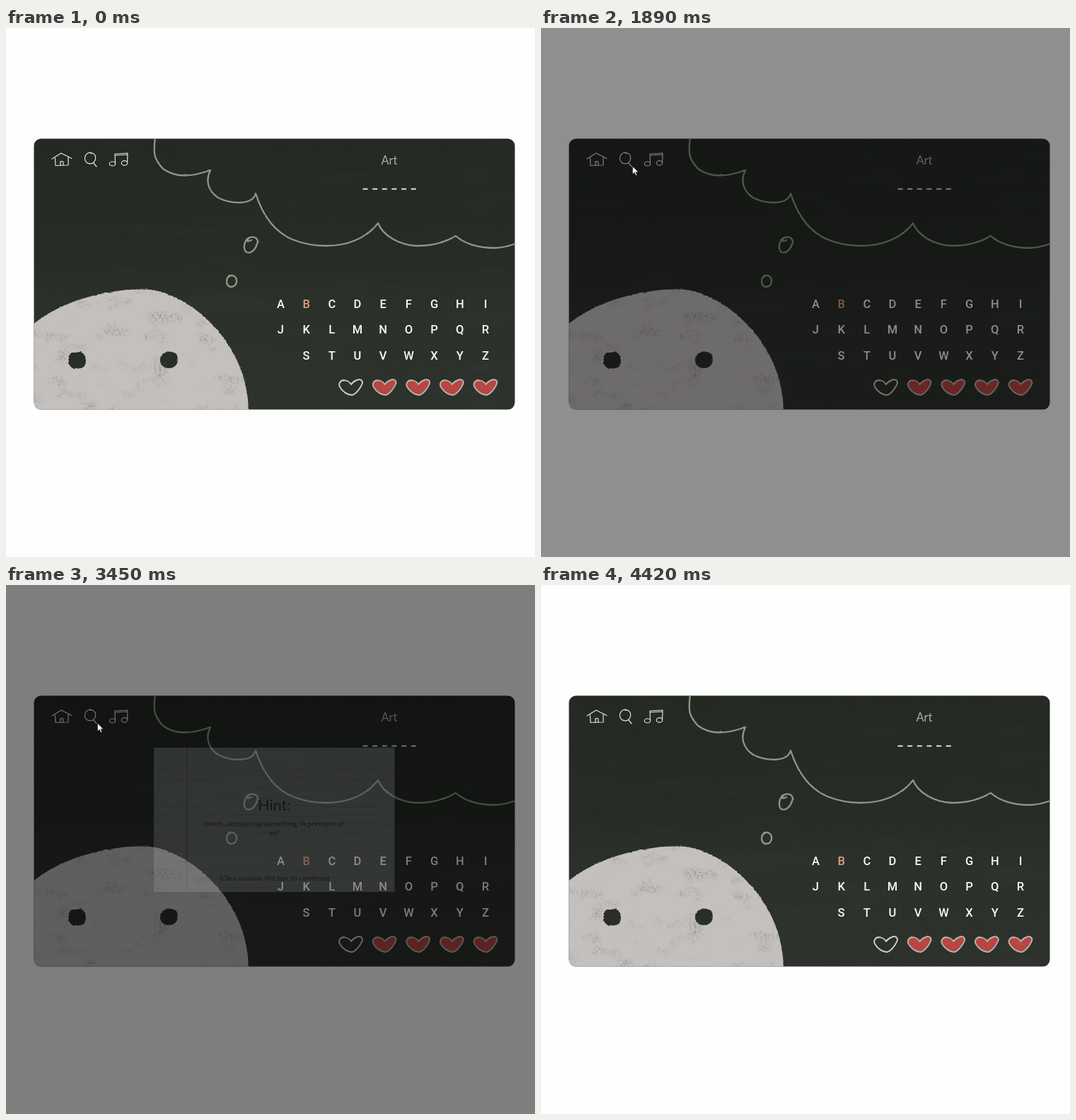
An HTML page for the animation above (4.82 s loop, 748x748 px).

```html
<!DOCTYPE html>
<html lang="en">
<head>
<meta charset="utf-8">
<title>Word game hint</title>
<style>
  html, body { margin: 0; height: 100%; overflow: hidden; background: #fefefe; }
  svg { display: block; width: 100vw; height: 100vh; }
  text { font-family: Lato, sans-serif; text-anchor: middle; }
  #letters text { font-family: Roboto, sans-serif; }
  .line { fill: none; stroke-linecap: round; stroke-linejoin: round; }
</style>
</head>
<body>
<svg viewBox="0 0 748 748">
  <defs>
    <linearGradient id="slate" x2="0" y2="1">
      <stop offset="0" stop-color="#242923"/>
      <stop offset=".45" stop-color="#272c26"/>
      <stop offset=".6" stop-color="#2b302a"/>
      <stop offset="1" stop-color="#2d322c"/>
    </linearGradient>
    <clipPath id="boardShape"><rect x="39.5" y="156.6" width="680" height="383" rx="10"/></clipPath>
    <clipPath id="noteShape"><rect x="209" y="246" width="340.5" height="204"/></clipPath>
    <filter id="chalk" x="-10%" y="-10%" width="120%" height="120%" color-interpolation-filters="sRGB">
      <feTurbulence type="fractalNoise" baseFrequency=".25" numOctaves="2" seed="4"/>
      <feDisplacementMap in="SourceGraphic" scale="1.8" xChannelSelector="R" yChannelSelector="G"/>
    </filter>
    <filter id="smear" x="0" y="0" width="1" height="1" color-interpolation-filters="sRGB">
      <feTurbulence type="fractalNoise" baseFrequency=".008 .04" numOctaves="3" seed="8"/>
      <feColorMatrix values="0 0 0 0 .6  0 0 0 0 .65  0 0 0 0 .58  3 0 0 0 -1.4"/>
    </filter>
    <filter id="paint" x="-5%" y="-5%" width="110%" height="110%" color-interpolation-filters="sRGB">
      <feTurbulence type="fractalNoise" baseFrequency=".3" numOctaves="2" seed="3" result="grain"/>
      <feDisplacementMap in="SourceGraphic" in2="grain" scale="2.6" xChannelSelector="R" yChannelSelector="G" result="body"/>
      <feTurbulence type="fractalNoise" baseFrequency=".03 .045" numOctaves="2" seed="12"/>
      <feColorMatrix values="0 0 0 0 0  0 0 0 0 0  0 0 0 0 0  2 0 0 0 -1.08" result="patches"/>
      <feColorMatrix in="grain" values="0 0 0 0 .3  0 0 0 0 .3  0 0 0 0 .29  1.6 0 0 0 -.6"/>
      <feComposite in2="patches" operator="in"/>
      <feComposite in2="body" operator="in" result="spots"/>
      <feMerge><feMergeNode in="body"/><feMergeNode in="spots"/></feMerge>
    </filter>
    <path id="heart" d="M1-4C-1-8-6-10-10-10C-15-9-18-4-14 1C-11 6-4 11 2 11C8 10 15 0 17-6C17-11 12-12 9-10C6-9 3-7 1-4Z"/>
  </defs>

  <rect width="748" height="748" fill="#fefefe"/>
  <g clip-path="url(#boardShape)">
    <rect x="39" y="156" width="681" height="384" fill="url(#slate)"/>
    <rect x="39" y="156" width="681" height="384" filter="url(#smear)" opacity=".02"/>
    <g class="line" stroke="#8b9a86" stroke-width="2.3" filter="url(#chalk)">
      <path d="M211 154C208 178 209 185 222 199C238 211 262 211 289 201C282 215 285 230 300 240C320 250 349 250 353 234C362 262 377 287 405 299C420 305 437 308 452 308C482 308 509 298 526 276C533 293 555 307 581 308C602 308 621 303 636 294C648 305 668 311 690 311C702 311 712 308 722 304.500"/>
      <path d="M343 298C336 301 335 313 340 317C347 320 354 312 356 302C355 294 345 294 340 299C339 302 343 302 347 300"/>
      <path d="M316 350C310 355 311 365 318 366C326 366 328 357 324 352C321 349 317 349 315 352"/>
    </g>
    <g filter="url(#paint)">
      <path fill="#c4c0bd" d="M32 424C66 395 103 382 140 375C163 370 190 368 212 371C248 380 279 403 303 432C328 464 343 500 343 545H32Z"/>
      <path fill="#292e28" d="M93 459L106 458Q113 463 113 470Q113 479 106 481L96 482Q88 478 88 470Q88 462 93 459ZM224 459Q234 455 241 461Q244 467 242 474Q239 481 230 481Q221 481 218 473Q217 463 224 459Z"/>
    </g>
  </g>

  <g class="line" stroke="#e4e6e1" stroke-width="1.200">
    <path d="M65 185L78 177L93 184.500M69.500 184L70 194.500L88 194V183M77 194V188.500M77 190Q80 186.500 81 190V194"/>
    <path d="M122 177C115 174 110 181 112 187C114 193 123 194 126 187C128 181 125 176 119 177M123.500 190.500L128 196"/>
    <path d="M154.500 191.500L154 178L172 177L171.500 190.500M154 180L172 179"/>
    <ellipse cx="150.500" cy="192" rx="4.200" ry="3"/>
    <ellipse cx="167.500" cy="191" rx="4.200" ry="3.300"/>
  </g>
  <text x="542" y="192.500" font-size="16.500" fill="#a9aca7">Art</text>
  <path d="M504.500 227.600H580" stroke="#f4f5f2" stroke-width="1.700" stroke-dasharray="7 6.650"/>
  <g id="letters" font-size="16.500" font-weight="500" fill="#fafaf8"></g>
  <g id="hearts" class="line" stroke="#b5b5ae" stroke-width="1.900"></g>

  <rect id="shade" width="748" height="748"/>
  <g id="note">
    <rect x="209" y="246" width="340.500" height="204" fill="#e5edf1"/>
    <g clip-path="url(#noteShape)">
      <g id="rules" class="line" stroke="#bac5ca" stroke-width="1"></g>
      <path class="line" d="M255.500 246Q256.500 300 256 340T255.500 450" stroke="#da7566" stroke-width="1.200"/>
    </g>
    <g fill="#20252a">
      <text x="379.500" y="335.500" font-size="21.500">Hint:</text>
      <g font-size="10.400">
        <text x="379.500" y="357.500">Hmm...something something "A principle of</text>
        <text x="379.500" y="370.500">art"</text>
        <text x="379.500" y="434.500">(Click outside the box to continue)</text>
      </g>
    </g>
  </g>
  <circle id="press" cx="129" cy="196" r="8.300" fill="#f4e900" opacity=".55"/>
  <path id="cursor" d="M0 0V11.200L2.600 8.800L4.500 13L6.200 12.200L4.400 8.200H8Z" fill="#fff" stroke="#222" stroke-width=".6"/>
</svg>

<script>
const $ = id => document.getElementById(id);
const clamp = v => Math.min(1, Math.max(0, v));
const ramp = (t, start, length) => clamp((t - start) / length);
const easeOut = p => 1 - (1 - p) ** 1.7;

$('letters').innerHTML = ['ABCDEFGHI', 'JKLMNOPQR', ' STUVWXYZ'].map((row, r) =>
  [...row].map((c, i) =>
    `<text x="${388.4 + 36.2 * i}" y="${395.7 + 36.4 * r}"${c === 'B' ? ' fill="#dda07c"' : ''}>${c}</text>`
  ).join('')).join('');

$('hearts').innerHTML = [0, 1, 2, 3, 4].map(i =>
  `<use href="#heart" x="${487 + 47.6 * i}" y="508"` +
  (i ? ' fill="#b84642"/>' : ' stroke="#d0d1cb"/>')).join('');

$('rules').innerHTML = Array.from({ length: 14 }, (_, i) => {
  let d = '';
  for (let x = 209; x <= 550; x += 11) {
    const wave = 1.4 * Math.sin(x / 43 + i * 2.1) + .7 * Math.sin(x / 17 + i * 4.3);
    d += `${d ? 'L' : 'M'}${x} ${(277.5 + 12.8 * i + wave).toFixed(1)}`;
  }
  return `<path d="${d}"/>`;
}).join('');

const LOOP = 4820;
const RHYTHM = [[0, 390], [390, 70], [950, 200], [1150, 400], [1550, 65], [1680, 70],
  [2240, 950], [3190, 65], [3720, 70], [4420, 400]];

function snap(t) {
  const [start, step] = RHYTHM.findLast(([s]) => s <= t);
  return start + Math.floor((t - start) / step) * step;
}

const curve = (u, a, b, c) =>
  a.map((v, i) => (1 - u) ** 2 * v + 2 * u * (1 - u) * b[i] + u * u * c[i]);

function cursorAt(t) {
  if (t < 390 || t >= 4420) return null;
  if (t < 950) return curve(easeOut(ramp(t, 390, 490)), [674, 418], [350, -20], [131, 203]);
  if (t < 1150) return [129.5, 203];
  if (t < 1550) return [130, 203];
  if (t < 1820) return [130, 195.5];
  return curve(ramp(t, 3650, 700), [129.5, 195.5], [420, 620], [709, 730]);
}

function draw(now) {
  const t = snap(now % LOOP);
  $('shade').style.opacity = .5 * (ramp(t, 1758, 150) - ramp(t, 3471, 150));
  $('note').style.opacity = ramp(t, 1978, 150) - ramp(t, 3321, 150);
  const lift = 1 - easeOut(ramp(t, 1978, 270)) + easeOut(ramp(t, 3321, 300));
  $('note').setAttribute('transform', `translate(0 ${-26 * lift})`);
  const pressed = (t >= 1550 && t < 1680) || (t >= 3190 && t < 3320);
  $('press').style.display = pressed ? '' : 'none';
  const pos = cursorAt(t);
  $('cursor').style.display = pos ? '' : 'none';
  if (pos) $('cursor').setAttribute('transform', `translate(${pos})`);
}

const begin = performance.now();
function tick() {
  draw(performance.now() - begin);
  requestAnimationFrame(tick);
}
tick();
</script>
</body>
</html>
```
